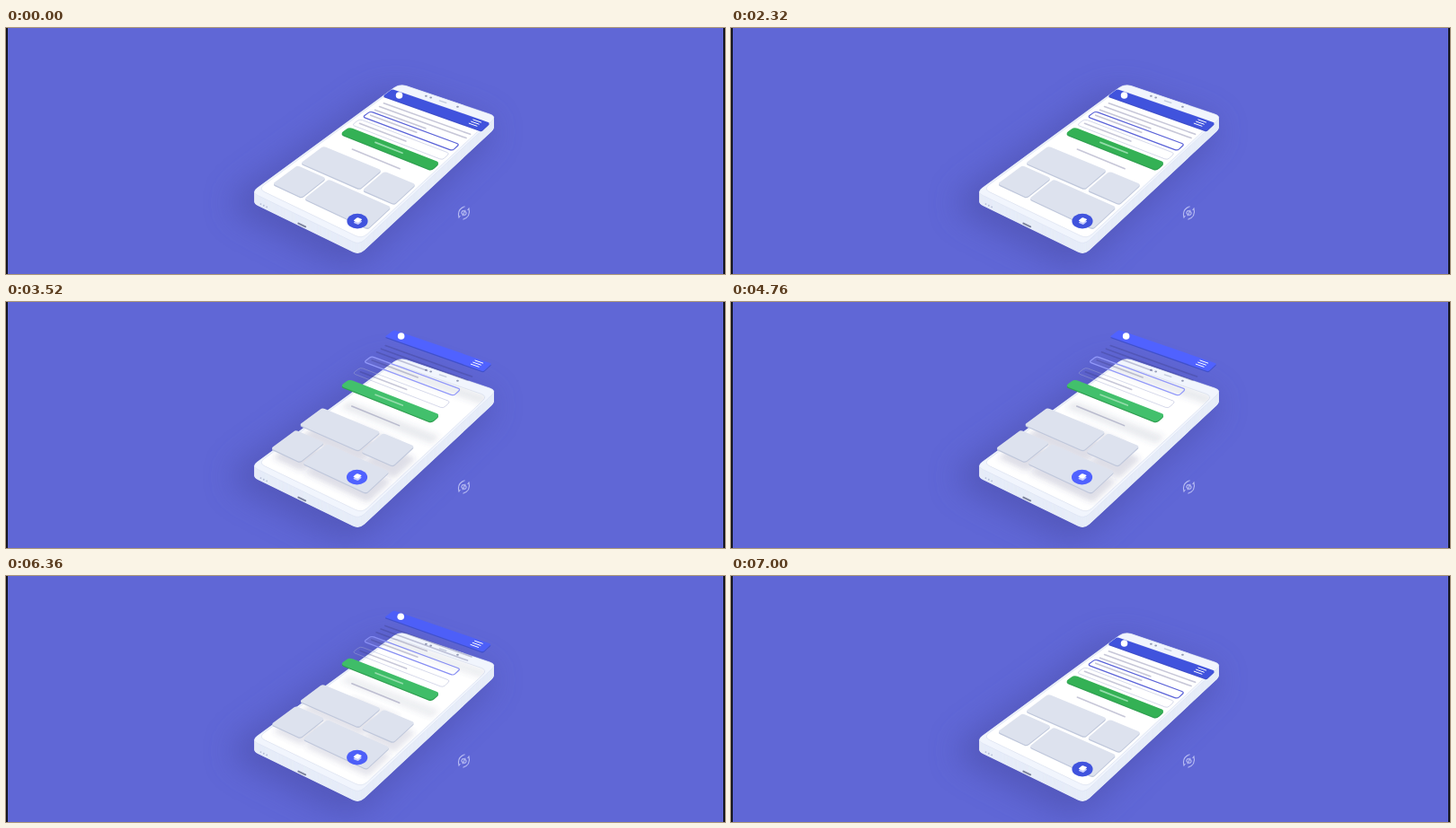
An HTML page for the animation above (7.08 s loop, 800 px wide and 274 px high).

```html
<!DOCTYPE html>
<html lang="en">
<head>
<meta charset="utf-8">
<title>Phone layers</title>
<style>
html, body { margin: 0; width: 100%; height: 100%; overflow: hidden; background: #6067d6; }
svg { display: block; width: 100%; height: 100%; }
</style>
</head>
<body>
<svg id="stage" viewBox="0 0 800 274" xmlns="http://www.w3.org/2000/svg"></svg>
<script>
const LOOP = 7080, RISE = 2325, FALL = 6245, SPAN = 750;
const LEFT = .06, RIGHT = .95, GAP = .025;
const DEPTH = 11.5;
const stage = document.getElementById('stage');

// Perspective from the phone's face (u across, v down, both 0..1) to the stage.
function at(u, v, drop = 0) {
  const w = 1 - .0742 * u - .1946 * v;
  return [(438 + 67.5 * u - 218.1 * v) / w, (62 + 29.2 * u + 85.4 * v) / w + drop];
}

const fix = p => p.map(n => n.toFixed(2)).join(',');
const quad = (u0, v0, u1, v1) => [at(u0, v0), at(u1, v0), at(u1, v1), at(u0, v1)];

function rounded(pts, r) {
  const toward = (a, b) => {
    const k = Math.min(.5, r / Math.hypot(b[0] - a[0], b[1] - a[1]));
    return fix(a.map((n, i) => n + (b[i] - n) * k));
  };
  return pts.map((c, i) => {
    const prev = pts[(i + 3) % 4], next = pts[(i + 1) % 4];
    return `${i ? 'L' : 'M'}${toward(c, prev)}Q${fix(c)} ${toward(c, next)}`;
  }).join('') + 'Z';
}

const shape = (pts, r, attrs) => `<path d="${rounded(pts, r)}" ${attrs}/>`;
const dot = (p, rx, ry, attrs) =>
  `<ellipse cx="${p[0].toFixed(2)}" cy="${p[1].toFixed(2)}" rx="${rx}" ry="${ry}" ${attrs}/>`;
const line = (u0, u1, v, color, width, drop = 0) =>
  `<path d="M${fix(at(u0, v, drop))}L${fix(at(u1, v, drop))}" stroke="${color}" stroke-width="${width}" stroke-linecap="round"/>`;
const text = (u0, u1, v) => line(u0, u1, v, 'rgba(50,50,110,.27)', 1.6);
const slab = (pts, r, face, side) =>
  shape(pts, r, `fill="${side}" transform="translate(0 1.3)"`) + shape(pts, r, face);
const shadow = (pts, alpha) =>
  shape(pts, 3, `class="shadow" fill="#4a5078" fill-opacity="${alpha}" filter="url(#soft)"`);
const times = (n, f) => Array.from({ length: n }, (_, i) => f(i)).join('');

// Parts near the top of the screen float higher than those at the bottom.
function height(v) {
  const s = Math.min(1, Math.max(0, (v - .1) / .74));
  return 10.5 + 13.25 * (1 + Math.cos(Math.PI * s));
}
const layer = (v, body, rise = height(v), lead = 0) =>
  `<g class="layer" data-rise="${rise}" data-lead="${lead}">${body}</g>`;

const face = quad(0, 0, 1, 1);
const screen = quad(.015, .062, .98, .97);
const header = quad(0, .062, 1, .136);
const button = quad(LEFT, .431, RIGHT, .493);
const field = i => quad(LEFT, .277 + i * .078, RIGHT, .333 + i * .078);

const cards = [.65, .36].flatMap((split, row) => {
  const v = .605 + row * .165;
  return [[LEFT, split - GAP / 2], [split + GAP / 2, RIGHT]]
    .map(([u0, u1]) => ({ v: v + .07, pts: quad(u0, v, u1, v + .145) }));
});

const phone = () =>
  shape(quad(-.08, .05, 1.12, 1.12), 30, 'fill="#4a4ca6" opacity=".55" filter="url(#wide)"') +
  times(24, i => shape(face, 8,
    `fill="${i < 22 ? '#e6ecf8' : '#e9eff9'}" transform="translate(0 ${DEPTH - i * DEPTH / 23})"`)) +
  shape(face, 8, 'fill="#f1f5fd" stroke="#d9e0f1" stroke-width=".6"') +
  shape(screen, 8, 'fill="#fff" stroke="#d5dcec" stroke-width=".6"') +
  times(3, i => dot(at(.095 + i * .03, 1, 8), .9, .9, 'fill="#b4bdd5"')) +
  line(.46, .525, 1, '#7d839d', 2, 9) +
  line(.46, .53, .026, '#c3cbdd', 1.2) +
  [.32, .37, .645].map(u => dot(at(u, .026), 1.4, 1, 'fill="#9299b4"')).join('');

const shadows = () =>
  '<g clip-path="url(#screen)">' +
  shadow(header, .12) + shadow(button, .12) +
  cards.map(c => shadow(c.pts, .18)).join('') +
  shadow(quad(.28, .555, .74, .585), .18) + '</g>';

function fab() {
  const c = at(.843, .904);
  const tile = (dy, fill) => shape(
    [[0, -3], [5.5, -.8], [1, 3], [-4.5, .8]].map(([x, y]) => [c[0] + x, c[1] + y + dy]), 1, `fill="${fill}"`);
  return dot(c, 11.6, 8.4, 'class="blue"') + tile(1, '#c5ccff') + tile(-1.2, '#fff');
}

const content = () =>
  cards.map(c => layer(c.v, slab(c.pts, 3, 'fill="#dde2ee"', '#bfc7db'))).join('') +
  layer(.556, text(.28, .74, .556)) +
  layer(.462, slab(button, 4, 'class="green"', '#2f9f50') + line(.375, .64, .462, '#94dcaa', 1.7)) +
  layer(.383, shape(field(1), 3, 'fill="none" stroke="#a5acd0" stroke-opacity=".5" stroke-width=".9"') +
    text(.1, .57, .383)) +
  layer(.305, shape(field(0), 3, 'class="outline" fill="#fff" fill-opacity=".06" stroke-width="1.2"') +
    text(.1, .57, .302)) +
  layer(.22, times(3, i => text(.08, i < 2 ? RIGHT : .6, .187 + i * .034))) +
  layer(.1, slab(header, 2, 'class="blue"', '#4050cc') +
    dot(at(.115, .09), 3.8, 3.8, 'fill="#fff"') +
    times(3, i => line(.86, .935, .08 + i * .018, '#fff', 1))) +
  layer(.904, fab(), 20, 52);

const spinner = () =>
  '<g transform="translate(509.5 206) rotate(28)" fill="none" stroke="#b7bbf2" stroke-width="1.1">' +
  times(2, i => `<path d="M-2.5 -7Q-9 0 -2.5 7l.3 -2.4" transform="rotate(${i * 180})"/>`) +
  '<ellipse rx="2.6" ry="2.1"/><path d="M0 -3.6V3.6"/></g>';

stage.innerHTML =
  `<defs>
    <filter id="soft" x="-40%" y="-40%" width="180%" height="180%"><feGaussianBlur stdDeviation="3"/></filter>
    <filter id="wide" x="-40%" y="-40%" width="180%" height="180%"><feGaussianBlur stdDeviation="17"/></filter>
    <clipPath id="screen">${shape(screen, 8, '')}</clipPath>
  </defs>
  <rect width="800" height="274" fill="#6067d6"/>` +
  phone() + shadows() + content() + spinner() +
  '<path d="M0 0H2V274H0ZM798 0H800V274H798Z" fill="#14141f"/>';

const all = sel => [...stage.querySelectorAll(sel)];
const layers = all('.layer'), shades = all('.shadow');
const tints = [
  { els: all('.blue'), attr: 'fill', from: [64, 83, 221], to: [80, 98, 255] },
  { els: all('.green'), attr: 'fill', from: [52, 177, 85], to: [66, 192, 108] },
  { els: all('.outline'), attr: 'stroke', from: [90, 98, 216], to: [146, 153, 250] }
];

// cubic-bezier(.25, .1, .25, 1)
function ease(x) {
  if (x <= 0) return 0;
  if (x >= 1) return 1;
  const curve = (s, a, b) => 3 * (1 - s) ** 2 * s * a + 3 * (1 - s) * s * s * b + s ** 3;
  let lo = 0, hi = 1;
  for (let i = 0; i < 24; i++) {
    const mid = (lo + hi) / 2;
    if (curve(mid, .25, .25) < x) lo = mid; else hi = mid;
  }
  return curve(lo, .1, 1);
}

const lift = (t, lead = 0) => ease((t - RISE) / SPAN) - ease((t - FALL + lead) / SPAN);

function draw(t) {
  const p = lift(t);
  for (const el of layers) {
    const rise = +el.dataset.rise, k = lift(t, +el.dataset.lead);
    el.setAttribute('transform', `translate(${(rise - 23) * .15 * k} ${-rise * k})`);
  }
  for (const el of shades) el.setAttribute('opacity', p);
  for (const { els, attr, from, to } of tints) {
    const rgb = from.map((c, i) => Math.round(c + (to[i] - c) * p));
    for (const el of els) el.setAttribute(attr, `rgb(${rgb})`);
  }
}

const start = performance.now();
function tick(now) {
  draw(Math.max(0, now - start) % LOOP);
  requestAnimationFrame(tick);
}
draw(0);
requestAnimationFrame(tick);
</script>
</body>
</html>
```
